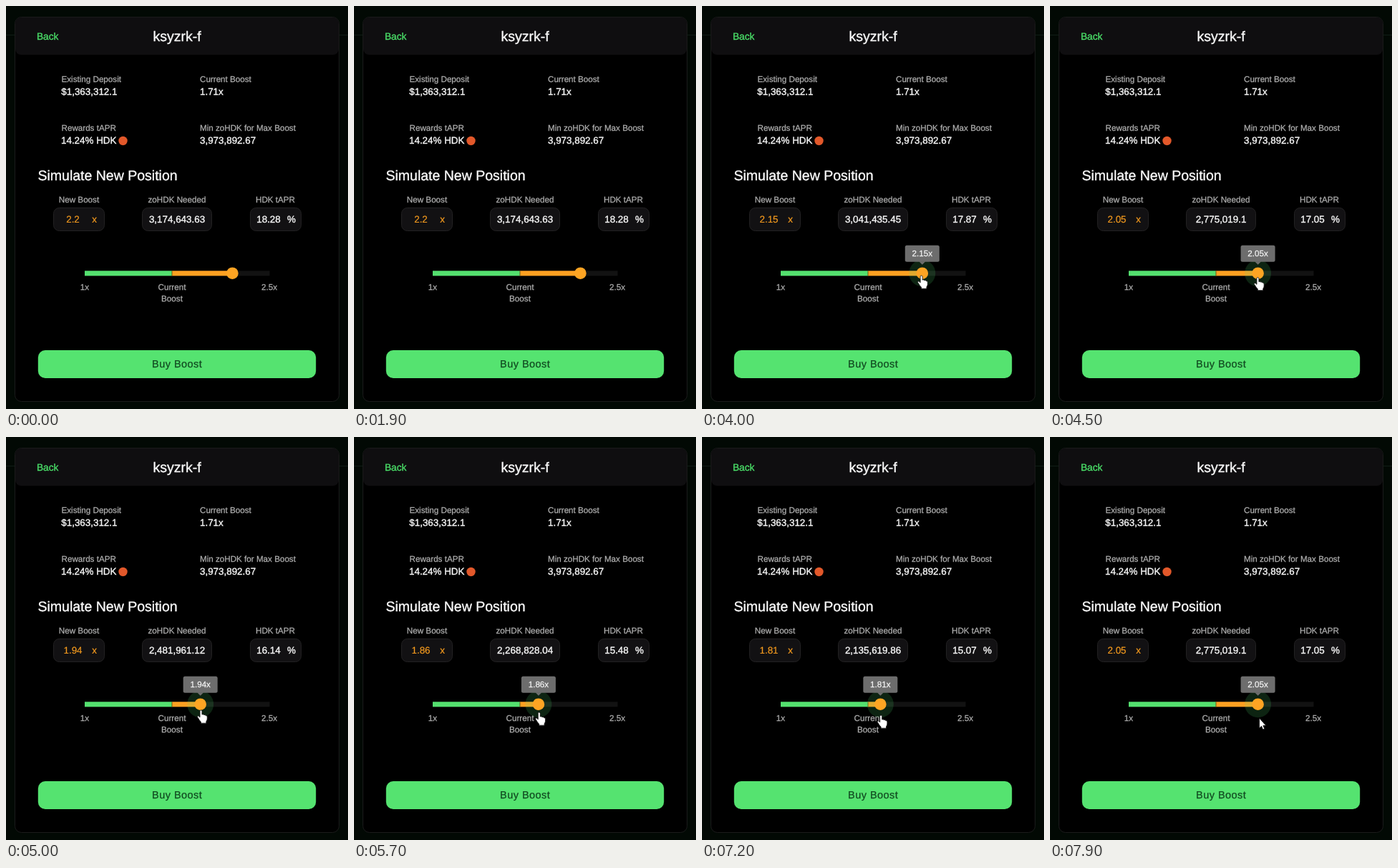
Recreate the animation shown at these times as an HTML page. Size 478 by 562 pixels, loop 8 s.

```html
<!DOCTYPE html>
<html lang="en">
<head>
<meta charset="utf-8">
<style>
  html, body { margin: 0; width: 100%; height: 100%; overflow: hidden; background: #020904; }
  svg { display: block; width: 478px; height: 562px; }
  text {
    font: 11.65px "Liberation Sans", Arial, sans-serif;
    text-rendering: geometricPrecision;
    fill: #b0b0b0; stroke: #b0b0b0; stroke-width: .25px;
  }
  .mid { text-anchor: middle; }
  .value { font-size: 13.4px; fill: #f6f6f6; stroke: #f6f6f6; stroke-width: .4px; }
  .title { font-size: 19.5px; fill: #f8f8f8; stroke: #f8f8f8; stroke-width: .4px; }
  .orange { fill: #f39a1e; stroke: #f39a1e; stroke-width: .2px; }
  .back { font-size: 13.6px; fill: #4ade68; stroke: #4ade68; stroke-width: .4px; }
  .buy { font-size: 14.5px; letter-spacing: .45px; fill: #114a20; stroke: #114a20; }
  .tip { fill: #f4f4f4; stroke: #f4f4f4; }
  .box { fill: #121113; stroke: #222122; }
</style>
</head>
<body>
<svg viewBox="0 0 478 562">
  <rect width="478" height="562" fill="#020904"/>
  <path d="M0 40.5H12M466 40.5H478" stroke="#101d16"/>
  <rect x="12.5" y="15.5" width="453" height="536" rx="9" fill="#000" stroke="#1b1b1b"/>
  <rect x="13" y="16" width="452" height="52" rx="8" fill="#0f0e10"/>
  <text class="back" x="43" y="47">Back</text>
  <text class="title mid" x="239" y="48.5">ksyzrk-f</text>

  <text x="77.5" y="106">Existing Deposit</text>
  <text class="value" x="77.3" y="124">$1,363,312.1</text>
  <text x="271" y="106">Current Boost</text>
  <text class="value" x="271" y="124">1.71x</text>
  <text x="77.5" y="174">Rewards tAPR</text>
  <text class="value" x="77" y="192">14.24% HDK</text>
  <circle cx="163.5" cy="188" r="6.2" fill="#e2582a"/>
  <text x="271" y="174">Min zoHDK for Max Boost</text>
  <text class="value" x="271" y="192">3,973,892.67</text>

  <text class="title" x="44.5" y="243">Simulate New Position</text>
  <text class="mid" x="102" y="274">New Boost</text>
  <text class="mid" x="239" y="274">zoHDK Needed</text>
  <text class="mid" x="376.5" y="274">HDK tAPR</text>
  <rect class="box" x="66.5" y="281.5" width="71" height="32" rx="8"/>
  <rect class="box" x="190.5" y="281.5" width="97" height="32" rx="8"/>
  <rect class="box" x="341.5" y="281.5" width="71" height="32" rx="8"/>
  <text class="value orange mid" id="boost" x="93.5" y="302"></text>
  <text class="value orange mid" x="123.5" y="302">x</text>
  <text class="value mid" id="needed" x="239" y="302"></text>
  <text class="value mid" id="apr" x="367" y="302"></text>
  <text class="value mid" x="399" y="302">%</text>

  <rect x="110" y="369.3" width="258.5" height="7" fill="#121212"/>
  <rect x="110" y="369.3" width="122" height="7" fill="#54e06f"/>
  <rect id="fill" x="232" y="369.3" height="7" fill="#fda021"/>
  <rect x="231.5" y="369.3" width="1" height="7" fill="#6e5a16"/>
  <text class="mid" x="110" y="396">1x</text>
  <text class="mid" x="232" y="396">Current</text>
  <text class="mid" x="232" y="412">Boost</text>
  <text class="mid" x="368" y="396">2.5x</text>

  <g id="thumb">
    <g id="hover">
      <circle id="halo" fill="#54e06f" fill-opacity=".16"/>
      <rect id="tip" y="-39" height="23" rx="2.5" fill="#6d6d6d"/>
      <path d="M-4.5 -16.5H4.5L0 -12Z" fill="#6d6d6d"/>
      <text class="tip mid" id="tipText" y="-23.5"></text>
    </g>
    <circle r="8.3" fill="#fda423"/>
  </g>

  <rect x="44.8" y="480" width="388.4" height="39" rx="10" fill="#55e370"/>
  <text class="buy mid" x="239.2" y="504">Buy Boost</text>

  <g id="cursor" fill="#fff" stroke="#111" stroke-width=".9" stroke-linejoin="round">
    <path id="hand" transform="translate(-.8) scale(.93)" d="M-2 1.5Q-2 0 -.5 0T1.2 1.5V6.5Q3 5.5 4 7Q5.8 6.3 6.700 8Q9 7.500 9 10V13Q9 15 7.500 17V19.500H-.5V17.500Q-3 15 -4.500 12Q-6.800 9.500 -5.500 8.500Q-4 8 -2 10.500Z"/>
    <path id="arrow" d="M0 0V14L3 11.3L5 16L7.3 15L5.3 10.5H9.3Z"/>
  </g>
</svg>
<script>
const LOOP = 8000, HOVER = 2900, ARROW = 7600;
// time, boost, pointer tip y
const drag = [
  [3300, 2.2, 375], [4000, 2.15, 376], [5000, 1.94, 381], [5700, 1.86, 384],
  [6400, 1.81, 387], [7200, 1.81, 388], [7900, 2.05, 392]
];
const el = id => document.getElementById(id);
const set = (id, attrs) => {
  for (const name in attrs) el(id).setAttribute(name, attrs[name]);
};
const show = (id, on) => set(id, { visibility: on ? 'visible' : 'hidden' });

function sample(t, column) {
  if (t <= drag[0][0]) return drag[0][column];
  const i = drag.findIndex(k => t <= k[0]);
  const a = drag[i - 1], b = drag[i];
  return a[column] + (b[column] - a[column]) * (t - a[0]) / (b[0] - a[0]);
}

function draw(time) {
  const t = Math.floor(time % LOOP / 100) * 100;
  const boost = Math.round(sample(t, 1) * 100) / 100;
  const x = 110 + (boost - 1) * 172;
  const delta = 2.2 - boost;
  const label = boost + 'x';

  el('boost').textContent = boost;
  el('needed').textContent = (3174643.63 - delta * 2664163.51)
    .toLocaleString('en-US', { maximumFractionDigits: 2 });
  el('apr').textContent = +(18.28 - delta * 8.23).toFixed(2);
  el('tipText').textContent = label;

  const width = label.length > 4 ? 48 : 42;
  const lead = Math.min(2, Math.max(0, t - 4000) / 500);
  set('tip', { x: -width / 2, width });
  set('fill', { width: x - 232 });
  set('thumb', { transform: `translate(${x} 372.7)` });
  set('halo', { r: Math.min(18.5, 14.5 + Math.max(0, t - HOVER) / 50) });
  set('cursor', { transform: `translate(${x + lead} ${sample(t, 2)})` });
  show('hover', t >= HOVER);
  show('hand', t > HOVER && t < ARROW);
  show('arrow', t >= ARROW);
}

const start = performance.now();
function frame() {
  draw(performance.now() - start);
  requestAnimationFrame(frame);
}
frame();
</script>
</body>
</html>
```
